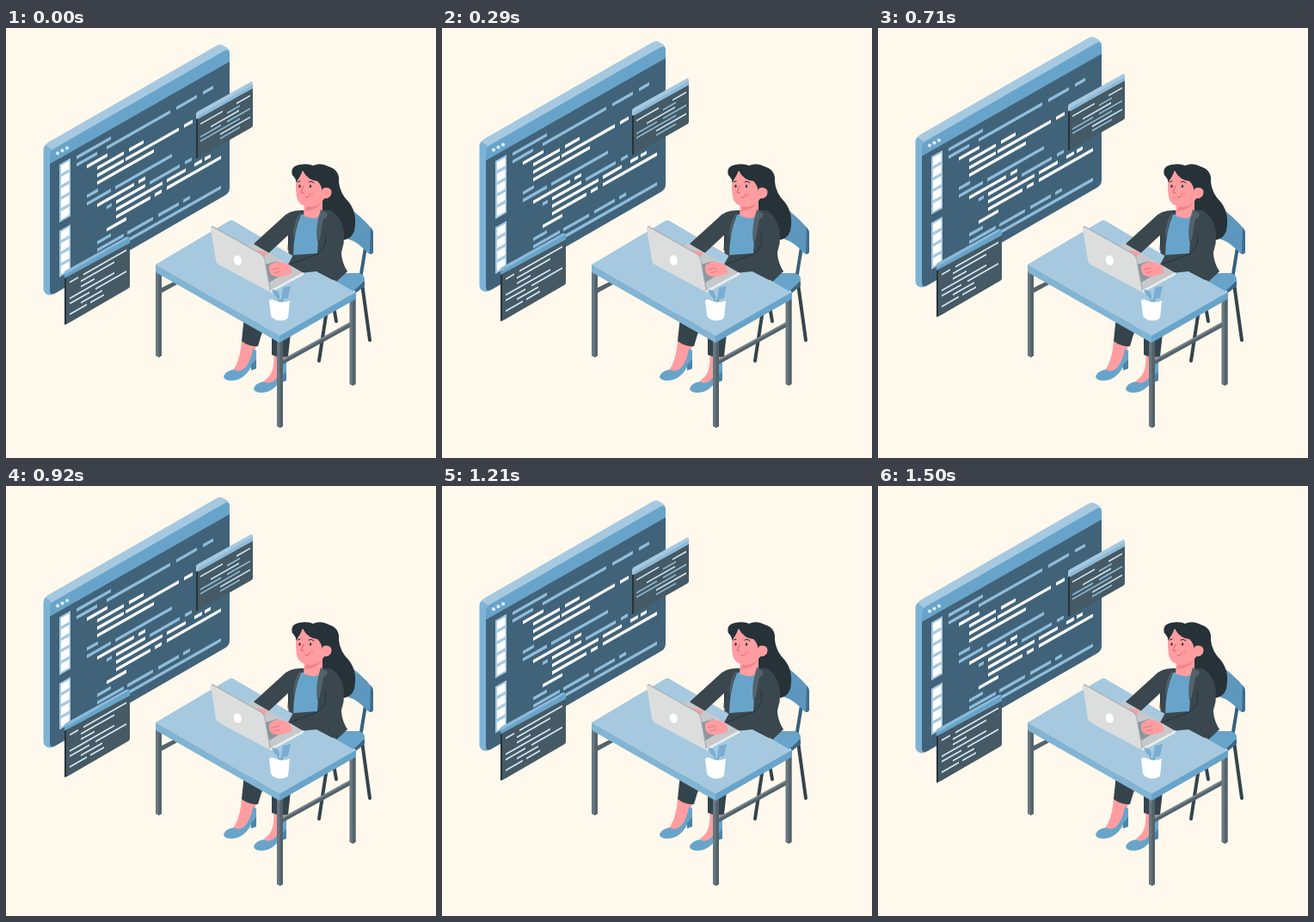
An HTML page that plays this animation: 500x500 px, repeating every 1.54 s.

```html
<!DOCTYPE html>
<html lang="en">
<head>
<meta charset="utf-8">
<title>Woman coding at a desk</title>
<style>
  html, body { margin: 0; width: 100%; height: 100%; overflow: hidden; background: #fff8ec; }
  svg { display: block; width: 100vw; height: 100vh; }
  .dark { fill: #263238; }
  .navy { fill: #3b474e; }
  .slate { fill: #34444c; }
  .blue { fill: #68a4ca; }
  .pale { fill: #a6c9e0; }
  .skin { fill: #ff9da0; }
  .stroke { fill: none; stroke-linecap: round; stroke-linejoin: round; }
</style>
</head>
<body>
<svg viewBox="0 0 500 500">
  <g id="screens">
    <path class="pale" d="M44 142Q44 136 49 133L244 21Q249 18 252 20L257 23Q260 25 260 31L52 151Z"/>
    <path fill="#7db3d6" d="M43.5 142Q43.5 138 46 136L53 141L60 150V306Q53 312 48 310Q43.5 308 43.5 303Z"/>
    <path fill="#41637a" d="M51 152L260 33V186Q260 192 254 195L58 308Q51 312 51 305Z"/>
    <path class="blue" d="M51 158V149Q51 143 56 140L253 27Q260 23 260 30V39Z"/>
    <g fill="#dbe9f3"><circle cx="60" cy="145.6" r="2.1"/><circle cx="65.5" cy="142.6" r="2.1"/><circle cx="71" cy="139.6" r="2.1"/></g>
    <g id="code"></g>

    <path class="dark" d="M221 103L224 101V150L221 152Z"/>
    <path fill="#455a64" d="M223 104L287 68V113Q287 115 285 116L225 150Q223 151 223 149Z"/>
    <path class="pale" d="M221 106V100Q221 98 223 97L284 63Q287 61 287 65V70Z"/>
    <path fill="#8dbad8" d="M223 106V102L287 66V70Z"/>
    <g id="upper"></g>

    <path class="dark" d="M68 289L71 288V344L68 345Z"/>
    <path fill="#455a64" d="M70 290L144 248V300Q144 302 142 303L73 343Q70 345 70 342Z"/>
    <path class="blue" d="M68 291V285Q68 283 70 282L140 243Q144 241 144 246V250Z"/>
    <path fill="#8dbad8" d="M68 285Q68 283 70 282L140 243L143 244L70 286Z"/>
    <g id="lower"></g>
  </g>

  <!-- chair -->
  <path class="stroke" stroke="#34444c" stroke-width="4" d="M373 328L364 387M380 318L384 341M413 290L423 363"/>
  <path class="stroke" stroke="#37617c" stroke-width="4" d="M418 255L412 292"/>
  <path class="blue" d="M391 285L411 285Q418 288 417 294L406 305L372 320L345 300Z"/>
  <path fill="#3d6784" d="M405 305L417 294V300L407 308Z"/>
  <path fill="#5d97bd" d="M396 207Q412 218 425 233Q427 235 427 239V260Q426 264 421 262Q410 249 397 245Z"/>
  <path fill="#3f6d8c" d="M424 232Q427 235 427 239V260Q427 263 423 263Z"/>

  <!-- lower legs -->
  <path class="skin" d="M274 363L292 367Q290 374 287 379Q282 397 267 401Q262 400 267 393Q273 381 274 363ZM311 377L326 379L322 401Q313 416 301 415Q297 412 305 406Q313 398 311 377Z"/>
  <path class="slate" d="M277 335L302 345Q296 357 293 370Q283 371 274 364ZM309 350L331 355L328 382Q318 384 309 380Z"/>
  <g class="blue">
    <path id="shoe" d="M253 405Q255 399 265 397Q270 401 277 396Q285 388 287 373L291 375V396L285 398V394Q277 409 263 410Q253 410 253 405Z"/>
    <use href="#shoe" x="35" y="14"/>
  </g>
  <path fill="#4a83aa" d="M285 392L291 385V396L285 398ZM320 406L326 399V410L320 412Z"/>

  <!-- woman -->
  <path class="dark" d="M377 164Q388 168 387 179Q388 192 399 203Q409 216 405 236Q401 248 386 247L362 218Z"/>
  <path class="navy" d="M346 212Q334 212 330 222L328 240L329 292L379 300L397 283Q386 266 392 244Q392 219 377 212Z"/>
  <path class="blue" d="M343 217L368 216Q362 231 363 246L362 264L334 266Q334 238 343 217Z"/>
  <path class="skin" d="M347 204L368 197L368 217Q358 225 346 218Z"/>
  <path fill="#f2838a" d="M349 208Q360 208 367 199Q366 211 348 213Z"/>
  <path fill="#53636b" d="M366 211L374 216L371 225L374 229L362 250Q359 232 366 211ZM344 212L340 222L334 245Q334 224 344 212Z"/>
  <path class="skin" d="M338 174Q342 167 354 165Q372 166 374 183Q373 205 355 208Q340 208 338 196Q336 184 338 174Z"/>
  <path class="dark" d="M333 171Q330 161 341 159Q351 157 357 160Q366 156 375 161Q388 165 387 178Q385 186 378 186L368 191Q367 182 362 178Q351 177 345 166Q342 173 337 180Q338 176 333 171Z"/>
  <path class="skin" d="M367 191Q368 184 375 186Q380 188 378 194Q376 199 369 198Z"/>
  <g class="dark"><ellipse cx="341.5" cy="184" rx="1.2" ry="1.7"/><ellipse cx="354" cy="184" rx="1.2" ry="1.7"/></g>
  <path class="stroke" stroke="#263238" d="M339 179L342 178M352 179Q355 177 358 180"/>
  <path class="stroke" stroke="#d85d6b" d="M346 184L343 191L346 192M348 197Q351 198 353 195"/>
  <path fill="#f2838a" d="M351 193Q356 190 359 194Q355 198 351 193Z" opacity=".45"/>

  <!-- table -->
  <path fill="#53636b" d="M181 302L201 292V297L181 308ZM322 385L400 342V348L322 391Z"/>
  <path fill="#7c8990" d="M322 385L400 342V344L322 387Z"/>
  <g id="legs"></g>
  <path class="pale" d="M174 275L260 224Q262 223 264 224L407 308L319 359Z"/>
  <path fill="#82b4d3" d="M174 275L318 358V366L174 284Z"/>
  <path class="blue" d="M318 358L407 307V315L318 366Z"/>

  <!-- body parts in front of the table edge -->
  <path class="navy" d="M346 212Q330 211 322 220L289 250Q284 257 289 263L303 264L329 240L338 219Z"/>
  <path class="navy" d="M369 222Q386 212 392 232Q396 252 386 269Q383 280 371 282L332 286L328 275L334 264L362 262Z"/>
  <path class="navy" d="M379 267L397 283L380 293L355 280Z"/>
  <path class="stroke" stroke="#263238" d="M371 239Q375 254 362 263L330 275M329 241L328 258"/>

  <!-- laptop -->
  <path fill="#c5c9cb" d="M280 253L286 250L346 285L307 307L278 289Z"/>
  <path fill="#8c979d" d="M298 276L315 271L331 281L306 296Z"/>
  <path fill="#eceeee" d="M307 305L346 284V287L307 308Z"/>
  <path class="skin" d="M306 276L313 272Q320 271 330 276L333 285Q322 290 313 289Q307 287 306 282ZM292 258L304 261L301 266L291 263Z"/>
  <path class="stroke" stroke="#e47984" d="M309 281L318 279M312 285L319 283"/>
  <path fill="#a7aeb2" d="M238 232L240 230L300 264L308 305L306 307Z"/>
  <path fill="#dcdddd" d="M238 233Q238 230 241 232L296 263Q299 265 300 268L307 307L249 276Q245 274 244 270Z"/>
  <ellipse cx="269.3" cy="270" rx="4.5" ry="5.8" fill="#fff" transform="rotate(-18 269.3 270)"/>

  <!-- cup -->
  <path class="stroke" stroke="#5c91b5" d="M318 318L312 305M319 318L328 302M321 318L325 304"/>
  <path fill="#79aed2" d="M309 304L316 306L319 314L313 312ZM322 302L331 300L328 314L320 316Z"/>
  <path fill="#fff" d="M306 317Q308 314 313 317Q321 321 330 317L328 337Q324 341 316 340Q309 338 308 334Z"/>
</svg>

<script>
const SLOPE = 0.57;
const WHITE = '#fff', PALE = '#8fbddb', ICE = '#d3e5f0';
const byId = id => document.getElementById(id);

function add(parent, d, fill) {
  const path = document.createElementNS('http://www.w3.org/2000/svg', 'path');
  path.setAttribute('d', d);
  path.setAttribute('fill', fill);
  parent.append(path);
}

// Slanted bar centred on y = level - SLOPE * x
function bar(parent, x1, x2, level, height, fill) {
  const y = x => level - SLOPE * x - height / 2;
  add(parent, `M${x1} ${y(x1)}L${x2} ${y(x2)}v${height}L${x1} ${y(x1) + height}Z`, fill);
}

// Each row: line number, colour, then pairs of left and right ends
function drawRows(id, top, pitch, height, rows) {
  for (const [line, fill, ...ends] of rows)
    for (let i = 0; i < ends.length; i += 2)
      bar(byId(id), ends[i], ends[i + 1], top + line * pitch, height, fill);
}

drawRows('code', 197.5, 8.67, 3.8, [
  [0, PALE, 82, 122],
  [1, PALE, 82, 106, 117, 191, 198, 222, 229, 241],
  [2, WHITE, 94, 118],
  [3, WHITE, 106, 137, 143, 160],
  [4, WHITE, 106, 137, 139, 201, 207, 217],
  [5, WHITE, 106, 172],
  [6, PALE, 94, 107],
  [7, PALE, 94, 122, 127, 193],
  [8, WHITE, 106, 149, 154, 162],
  [9, WHITE, 128, 162],
  [9, PALE, 117, 123, 167, 202, 208, 216],
  [10, WHITE, 128, 182, 187, 209, 219, 228, 231, 238],
  [11, WHITE, 128, 168, 173, 181, 187, 250],
  [12, WHITE, 117, 140],
  [13, PALE, 106, 122],
  [14, PALE, 106, 137, 141, 171, 177, 201, 206, 214],
  [15, PALE, 142, 250]
]);

drawRows('upper', 240.5, 5, 1.8, [
  [0, ICE, 226, 252, 268, 284],
  [1, PALE, 257, 272],
  [2, ICE, 238, 271],
  [3, PALE, 226, 250, 257, 284],
  [4, PALE, 226, 272],
  [5, ICE, 249, 284],
  [6, PALE, 249, 272]
]);

drawRows('lower', 338, 6.2, 2, [
  [0, ICE, 74, 84, 90, 140],
  [1, ICE, 87, 126],
  [2, ICE, 87, 103],
  [3, ICE, 74, 126],
  [4, ICE, 74, 97, 104, 140],
  [5, ICE, 87, 112],
  [6, ICE, 74, 94, 98, 114]
]);

// Sidebar tiles
const TILE = 13.3;
for (const [top, count] of [[194, 5], [271, 4]]) {
  const height = count * TILE + 1;
  bar(byId('code'), 62, 75, top + height / 2, height, '#a6c9e0');
  for (let i = 0; i < count; i++)
    bar(byId('code'), 64, 73.5, top + 7.2 + i * TILE, 9.5, WHITE);
}

for (const [x, top, bottom] of [[174, 280, 381], [315, 360, 463], [399.5, 310, 414]]) {
  add(byId('legs'), `M${x} ${top}h7V${bottom}l-3.5 2l-3.5 -2Z`, '#68777f');
  add(byId('legs'), `M${x + 3.5} ${top}h3.5V${bottom}l-3.5 2Z`, '#53636b');
}

const LOOP = 1540, FLOAT = 1500, LEAD = 55, RISE = 10;

function lift(time) {
  const phase = (time % LOOP + LEAD) % FLOAT / FLOAT;
  return RISE * (1 - Math.abs(1 - 2 * phase));
}

function draw() {
  const y = lift(0) - lift(performance.now());
  byId('screens').setAttribute('transform', `translate(0 ${y})`);
  requestAnimationFrame(draw);
}
draw();
</script>
</body>
</html>
```
